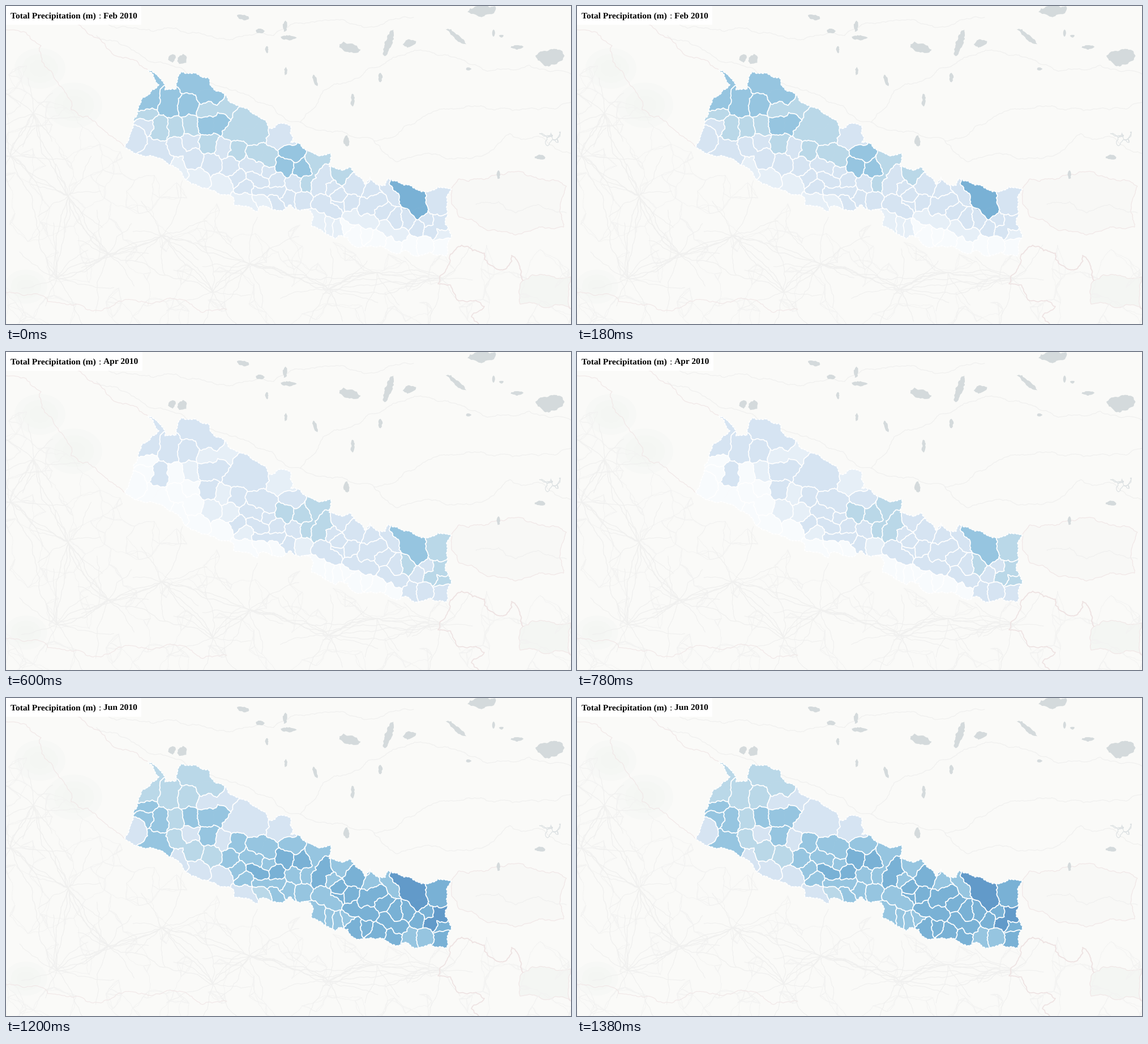
These frames come from a looping animation (998x561 px, 1.5 s). A matplotlib script:

```python
import math
import random

import matplotlib.pyplot as plt
import numpy as np
from matplotlib.animation import FuncAnimation
from matplotlib.collections import LineCollection
from matplotlib.patches import Ellipse, Polygon, Rectangle

W, H, DPI = 998, 561, 64
PX = 72 / DPI
LAND, LAKE, ROAD, PINK = "#fafaf8", "#d4dadc", "#f0f0ef", "#f1e7e7"
BLUES = ["#f8fbfd", "#e6eff7", "#d6e4f2", "#bad8e8", "#96c5e0", "#79b1d5", "#629ac9"]
MONTHS = ["Feb", "Mar", "Apr", "May", "Jun"]

NORTH = [(210, 247), (219, 226), (225, 200), (234, 179), (249, 158), (270, 139), (251, 113),
         (270, 126), (282, 142), (281, 148), (300, 147), (303, 130), (309, 116), (340, 121),
         (357, 126), (361, 140), (384, 154), (405, 174), (427, 181), (447, 196), (466, 216),
         (482, 207), (503, 212), (507, 232), (503, 241), (521, 245), (535, 256), (552, 265),
         (574, 260), (571, 283), (596, 290), (609, 284), (614, 292), (634, 315), (643, 302),
         (650, 311), (670, 316), (674, 305), (691, 309), (703, 316), (729, 325), (750, 326),
         (763, 319), (787, 323)]
SOUTH = [(778, 355), (776, 385), (787, 405), (778, 441), (749, 434), (728, 442), (705, 431),
         (696, 436), (670, 428), (645, 423), (618, 425), (604, 408), (588, 405), (582, 411),
         (558, 396), (540, 389), (537, 361), (520, 361), (501, 350), (480, 361), (462, 354),
         (448, 354), (444, 363), (402, 350), (400, 336), (375, 331), (345, 321), (314, 303),
         (284, 277), (244, 265)]

# Colour step in each month -> districts, each given by one or more centres
WEST = {
    "41223": [(258, 160), (290, 173), (325, 178), (330, 135, 357, 163)],
    "30122": [(355, 184, 392, 181)],
    "30024": [(243, 188)],
    "20024": [(241, 212), (260, 250, 280, 258), (472, 347)],
    "20022": [(229, 240), (324, 240)],
    "31244": [(271, 218)],
    "30023": [(298, 218)],
    "31124": [(327, 213)],
    "42234": [(355, 208, 377, 207)],
    "30222": [(402, 222, 440, 225, 418, 198)],
    "32234": [(360, 243)],
    "20023": [(303, 249, 330, 270)],
    "10012": [(303, 280), (335, 303), (419, 341)],
    "20122": [(384, 252), (483, 232)],
    "20123": [(362, 277)],
    "31234": [(404, 257)],
    "20134": [(395, 283), (422, 319)],
    "10022": [(383, 316)],
    "20234": [(410, 304)],
    "32244": [(445, 263, 463, 271)],
    "22244": [(430, 282, 446, 288)],
    "21245": [(438, 302, 452, 309)],
    "22234": [(461, 293)],
    "10023": [(449, 345)],
}
EAST = {
    "42244": [(503, 257)],
    "42345": [(491, 284), (523, 288)],
    "33344": [(549, 278, 534, 314)],
    "21235": [(476, 309)],
    "21224": [(510, 314)],
    "20244": [(452, 326, 480, 328), (496, 338), (560, 348, 578, 361)],
    "20124": [(524, 343)],
    "22345": [(554, 320, 566, 302)],
    "32244": [(590, 299)],
    "22244": [(576, 320), (648, 325), (686, 328)],
    "22245": [(613, 318), (588, 336), (587, 350), (606, 348), (637, 358, 655, 346),
              (665, 362), (688, 380), (744, 380)],
    "11235": [(612, 371, 640, 381)],
    "10245": [(672, 393, 695, 405)],
    "22355": [(709, 380)],
    "55456": [(724, 343, 728, 361)],
    "24345": [(760, 353)],
    "22255": [(728, 392)],
    "23356": [(765, 380, 748, 396)],
    "12345": [(768, 404)],
    "00245": [(767, 427)],
    "00244": [(738, 422), (714, 420)],
    "00045": [(686, 419)],
    "00035": [(656, 411)],
    "00025": [(635, 404), (620, 403)],
    "00024": [(602, 390)],
    "10024": [(583, 391), (567, 384), (550, 376)],
}

plt.rcParams["text.hinting"] = "no_hinting"
fig = plt.figure(figsize=(W / DPI, H / DPI), dpi=DPI, facecolor=LAND)
ax = fig.add_axes([0, 0, 1, 1])
ax.set(xlim=(0, W), ylim=(H, 0))
ax.axis("off")


def pairs(nums):
    return list(zip(nums[::2], nums[1::2]))


def bend(p, q, rng, amp, step):
    """Midpoint displacement from p up to, but not including, q."""
    dx, dy = q[0] - p[0], q[1] - p[1]
    if math.hypot(dx, dy) < step:
        return [p]
    k = rng.uniform(-amp, amp)
    m = ((p[0] + q[0]) / 2 - dy * k, (p[1] + q[1]) / 2 + dx * k)
    return bend(p, m, rng, amp, step) + bend(m, q, rng, amp, step)


def rough(a, b, key, amp=0.2, step=4):
    """Uneven edge that is the same from either side."""
    lo, hi = sorted([a, b])
    line = bend(lo, hi, random.Random(key), amp, step) + [hi]
    return line if a == lo else line[::-1]


def trace(pts, amp=0.14, step=4):
    out = []
    for a, b in zip(pts, pts[1:]):
        out += rough(a, b, f"{a}{b}", amp, step)[:-1]
    return out + [pts[-1]]


def lines(paths, color, width, z=1):
    return ax.add_collection(LineCollection(paths, colors=color, linewidths=width * PX,
                                            capstyle="round", zorder=z))


def shape(pts, amp=0.14, **style):
    return ax.add_patch(Polygon(trace(pts + pts[:1], amp), **style))


def blob(x, y, w, h, tilt=0):
    rng = random.Random(x * 1000 + y)
    c, s = math.cos(math.radians(tilt)), math.sin(math.radians(tilt))
    ring = []
    for t in np.linspace(0, math.tau, 10)[:-1]:
        r = rng.uniform(0.42, 0.58)
        u, v = w * r * math.cos(t), h * r * math.sin(t)
        ring.append((x + c * u - s * v, y + s * u + c * v))
    shape(ring, 0.2, fc=LAKE, lw=0, zorder=2)


# Base map: tinted ground
for x, y, size in [(120, 175, 100), (60, 110, 90), (35, 495, 75)]:
    for k in (1, 0.7, 0.4):
        ax.add_patch(Ellipse((x, y), size * k, size * k * 0.8, fc="#f2f6f2",
                             alpha=0.3, lw=0, zorder=0))
EAST_HILLS = [(787, 323), (800, 305), (835, 305), (868, 298), (940, 305), (990, 318),
              (985, 390), (900, 404), (850, 396), (822, 376), (800, 372)]
PLATEAU = [(913, 484), (930, 474), (998, 478), (998, 535), (950, 532), (908, 526)]
shape(EAST_HILLS, fc="#f8f8f6", ec=PINK, lw=1.2 * PX, zorder=0)
shape(PLATEAU, fc="#f4f6f3", ec=PINK, lw=1.2 * PX, zorder=0)

# Base map: road web, dense south of the country
rng = random.Random(11)
rim_x, rim_y = zip((0, 70), (80, 120), *sorted(SOUTH), (998, 420))


def on_plain(x, y):
    return y > np.interp(x, rim_x, rim_y) + 6


def nearest(p, group, n):
    return sorted(group, key=lambda o: math.dist(o, p))[1:n + 1]


spots = [(rng.uniform(-15, W + 15), rng.uniform(50, H + 15)) for _ in range(680)]
towns = [p for p in spots if on_plain(*p)]
lines([trace([p, o], 0.12, 7) for p in towns for o in nearest(p, towns, 3)], "#f3f3f2", 0.9)

hubs = [(275, 405), (570, 500), (8, 265), (180, 438), (48, 190), (430, 455),
        (655, 470), (365, 505), (110, 335), (770, 480), (90, 480)]
lines([trace([p, o], 0.1, 7) for p in hubs for o in nearest(p, hubs, 3)], ROAD, 1.3)
spokes = []
for hx, hy in hubs:
    for t in np.linspace(0, math.tau, 8)[:-1] + rng.random():
        r = rng.uniform(50, 110)
        end = hx + r * math.cos(t), hy + r * math.sin(t)
        if on_plain(*end):
            spokes.append(trace([(hx, hy), end], 0.1, 7))
lines(spokes, ROAD, 1.1)

# Base map: mountain roads, borders and rivers
for road in [
    (160, 52, 230, 82, 300, 108, 395, 148, 470, 176, 520, 205, 650, 238, 720, 208, 880, 180, 998, 170),
    (520, 205, 560, 150, 640, 110, 790, 90, 850, 115, 998, 120),
    (130, 30, 260, 45, 420, 52, 520, 30, 720, 20),
    (650, 238, 690, 275, 790, 270, 850, 260, 890, 225, 998, 260),
    (830, 350, 870, 345, 900, 365, 940, 350, 990, 365),
]:
    lines([trace(pairs(road), 0.13, 5)], ROAD, 1.2)
for color, width, border in [
    (PINK, 1.2, (115, 0, 132, 35, 185, 80, 215, 92, 250, 112)),
    (PINK, 1.1, (0, 42, 62, 70, 92, 135, 115, 183, 168, 215, 214, 249)),
    (PINK, 1.1, (0, 505, 100, 525, 200, 520, 290, 515, 390, 535)),
    ("#eee2e2", 1.8, (785, 438, 805, 422, 845, 436, 852, 455, 870, 465, 888, 458, 893, 440, 913, 484)),
    ("#eee2e2", 1.6, (785, 438, 763, 490, 785, 492, 800, 520, 845, 530, 822, 548, 835, 561)),
]:
    lines([trace(pairs(border), 0.18, 5)], color, width)

for spec in [(605, 73, 38, 18, 10), (676, 64, 13, 50, 18), (713, 66, 24, 13, -20),
             (796, 54, 46, 9, 38), (842, 7, 52, 18), (962, 90, 54, 26, -5), (498, 56, 28, 9),
             (546, 131, 6, 22, -20), (311, 94, 17, 17), (293, 92, 14, 14), (419, 20, 22, 10, 10),
             (449, 44, 14, 9), (461, 77, 6, 13), (493, 36, 8, 20), (494, 115, 5, 14),
             (903, 72, 22, 7), (861, 48, 5, 12), (875, 53, 8, 5), (817, 111, 10, 5),
             (661, 126, 8, 18), (612, 165, 6, 22), (602, 239, 10, 19), (943, 267, 20, 8),
             (870, 298, 6, 16)]:
    blob(*spec)
marsh = [(967 + rng.gauss(0, 12), 235 + rng.gauss(0, 8)) for _ in range(14)]
lines([trace([p, o], 0.25, 4) for p in marsh for o in nearest(p, marsh, 2)], "#dbe0e2", 1.1)

# Districts: cells around the centres, cut off at the country's edge
country = shape(NORTH + SOUTH, 0.15, fc="none", ec="white", lw=1.9 * PX, ls=(0, (1.5, 1.5)),
                capstyle="round", joinstyle="round", zorder=5)
sites = []
for group in (WEST, EAST):
    for steps, places in group.items():
        for place in places:
            sites += [(p, place, steps) for p in pairs(place)]


def cell(i):
    """Voronoi cell as (corner, neighbour across the edge that starts there)."""
    (ax_, ay), _, _ = sites[i]
    poly = [((150, 60), -1), ((850, 60), -1), ((850, 480), -1), ((150, 480), -1)]
    for j, ((bx, by), _, _) in enumerate(sites):
        if j == i:
            continue
        nx, ny = bx - ax_, by - ay
        c = (nx * (ax_ + bx) + ny * (ay + by)) / 2
        cut = []
        for (p, e), (q, _) in zip(poly, poly[1:] + poly[:1]):
            sp, sq = (nx * v[0] + ny * v[1] - c for v in (p, q))
            if sp <= 0:
                cut.append((p, e))
            if (sp <= 0) != (sq <= 0):
                t = sp / (sp - sq)
                m = (p[0] + t * (q[0] - p[0]), p[1] + t * (q[1] - p[1]))
                cut.append((m, j if sp <= 0 else e))
        poly = cut
    return poly


cells, seams = [], []
for i, (_, place, steps) in enumerate(sites):
    poly, ring = cell(i), []
    for (p, j), (q, _) in zip(poly, poly[1:] + poly[:1]):
        edge = rough(p, q, f"{min(i, j)}-{max(i, j)}")
        ring += edge[:-1]
        if j > i and sites[j][1] != place:
            seams.append(edge)
    patch = ax.add_patch(Polygon(ring, lw=0.6 * PX, zorder=3))
    patch.set_clip_path(country)
    cells.append((patch, steps))
lines(seams, "white", 1.8, 4).set_clip_path(country)

# Title
box = ax.add_patch(Rectangle((0, 0), 240, 33, fc="white", lw=0, zorder=6))


def label(x, s, weight="bold"):
    return ax.text(x, 22, s, family="Liberation Serif", weight=weight, size=15.45 * PX,
                   color="black", va="baseline", zorder=7)


label(8, "Total Precipitation (m)")
label(163.5, ":", "normal")
month = label(172, "")


def update(i):
    for patch, steps in cells:
        patch.set_color(BLUES[int(steps[i])])
    month.set_text(f"{MONTHS[i]} 2010")
    end = month.get_window_extent().x1
    box.set_width(ax.transData.inverted().transform((end, 0))[0] + 7.5)
    return [box, month] + [patch for patch, _ in cells]


anim = FuncAnimation(fig, update, frames=len(MONTHS), interval=300, repeat=True, repeat_delay=0)
plt.show()
```
